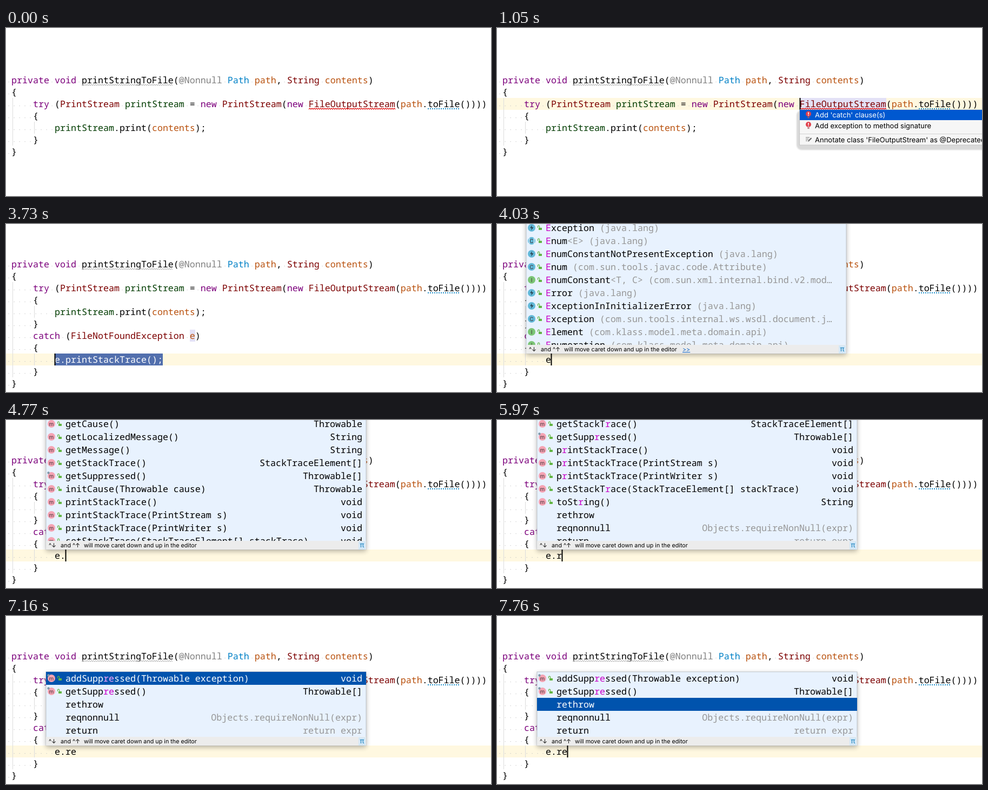
An HTML page for the animation above (8 s loop, 897 by 310 pixels).

```html
<!DOCTYPE html>
<html lang="en">
<head>
<meta charset="utf-8">
<title>Code completion</title>
<style>
  html, body { margin: 0; width: 100%; height: 100%; overflow: hidden; background: #fff; }
  svg { display: block; width: 897px; height: 310px; }
  text { white-space: pre; text-rendering: geometricPrecision; }
  .code { font: 16.667px "Noto Sans Mono", monospace; }
  .menu { font: 13px Inter, sans-serif; }
  .hint { font: 10.75px Inter, sans-serif; }
  .badge { font: 10px Inter, sans-serif; text-anchor: middle; }
</style>
</head>
<body>
<svg id="stage" viewBox="0 0 897 310" xmlns="http://www.w3.org/2000/svg"></svg>
<script>
const stage = document.getElementById('stage');
const LOOP = 8000, COL = 10, LINE = 22, ROW = 24;
const CUTS = [0, 450, 750, 1050, 2100, 2240, 2540, 3290, 3730, 3880, 4030, 4620, 4770,
  5220, 5670, 5970, 6260, 6410, 7160, 7460, 7760];

const COLORS = {};
const paint = (color, words) => words.split(' ').forEach(w => COLORS[w] = color);
paint('#7c007c', 'private void try new catch');
paint('#7c0000', 'String PrintStream FileOutputStream FileNotFoundException');
paint('#0080c6', 'Path');
paint('#b9520f', 'path contents e');
paint('#003c00', 'printStream');
paint('#808080', '@Nonnull');

const HEAD = [
  ' private void printStringToFile(@Nonnull Path path, String contents)',
  ' {',
  '     try (PrintStream printStream = new PrintStream(new FileOutputStream(path.toFile())))',
  '     {',
  '         printStream.print(contents);',
  '     }'
];
const CATCH = ['     catch (FileNotFoundException e)', '     {', '         ', '     }'];

const TYPES = [
  'x|Exception (java.lang)',
  'a|Enum<E> (java.lang)',
  'x|EnumConstantNotPresentException (java.lang)',
  'C|Enum (com.sun.tools.javac.code.Attribute)',
  'I|EnumConstant<T, C> (com.sun.xml.internal.bind.v2.mod…',
  'x|Error (java.lang)',
  'x|ExceptionInInitializerError (java.lang)',
  'C|Exception (com.sun.tools.internal.ws.wsdl.document.j…',
  'I|Element (com.klass.model.meta.domain.api)',
  'I|Enumeration (com.klass.model.meta.domain.api)'
];
const SUPPRESSED = 'f|getSuppressed()|Throwable[]';
const TRACE = 'm|getStackTrace()|StackTraceElement[]';
const PRINTS = [
  'm|printStackTrace()|void',
  'm|printStackTrace(PrintStream s)|void',
  'm|printStackTrace(PrintWriter s)|void',
  'm|setStackTrace(StackTraceElement[] stackTrace)|void'
];
const METHODS = [
  'm|getCause()|Throwable',
  'm|getLocalizedMessage()|String',
  'm|getMessage()|String',
  TRACE, SUPPRESSED,
  'm|initCause(Throwable cause)|Throwable',
  ...PRINTS
];
const TEMPLATES = ['|rethrow|', '|reqnonnull|Objects.requireNonNull(expr)', '|return|return expr'];
const WITH_R = [TRACE, SUPPRESSED, ...PRINTS, 'm|toString()|String', ...TEMPLATES];
const WITH_RE = ['f|addSuppressed(Throwable exception)|void', SUPPRESSED, ...TEMPLATES];

const esc = s => s.replace(/&/g, '&amp;').replace(/</g, '&lt;');
const rect = (x, y, w, h, fill, more = '') =>
  `<rect x="${x}" y="${y}" width="${w}" height="${h}" fill="${fill}" ${more}/>`;
const path = (d, stroke, width = 1, more = '') =>
  `<path d="${d}" fill="none" stroke="${stroke}" stroke-width="${width}" ${more}/>`;
const rawText = (x, y, body, kind, fill = '#000', more = '') =>
  `<text class="${kind}" x="${x}" y="${y}" fill="${fill}" ${more}>${body}</text>`;
const text = (x, y, s, ...rest) => rawText(x, y, esc(s), ...rest);
const span = (s, fill) => `<tspan fill="${fill}">${esc(s)}</tspan>`;

const wave = (x, y, w, color) => path(`M${x} ${y}` + 'l2 -2l2 2'.repeat(Math.floor(w / 4)), color, 1.1);
const guide = (x, from, to) => rect(x, from, 1, to - from, '#dcdcdc');
const caret = x => rect(x - .5, 239, 2, LINE, '#000');

function codeLine(s, top) {
  const indent = s.search(/\S|$/);
  const body = s.slice(indent).replace(/@?\w+/g, w => COLORS[w] ? span(w, COLORS[w]) : w);
  const dots = [...s].map((c, i) => c === ' ' ? rect(i * COL + 4.5, top + 14, 1.2, 1.2, '#c6c6c6') : '');
  return dots.join('') + rawText(indent * COL, top + 17, body, 'code');
}

function codeBlock(lines, top, error) {
  const row = n => top + n * LINE;
  return guide(12, row(2), row(lines.length - 1)) + guide(52, row(4), row(5)) +
    lines.map((s, i) => codeLine(s, row(i))).join('') +
    wave(140, top + 21, 170, '#bdbdbd') +
    (error ? wave(560, row(2) + 21, 160, '#e00000') : '') +
    path(`M780 ${row(2) + 20}H839`, '#1a8cc8', 2, 'stroke-dasharray="2 2"');
}

function bulb(x, y) {
  return `<circle cx="${x}" cy="${y - 1.5}" r="5" fill="#e0404c"/>` +
    rect(x - .8, y - 4.5, 1.6, 4, '#fff') + rect(x - .8, y + .5, 1.6, 1.5, '#fff') +
    rect(x - 2, y + 4, 4, 1, '#a06068') + rect(x - 1.5, y + 5.5, 3, 1, '#a06068');
}

function fixMenu() {
  return rect(554, 152, 360, 73, '#d9d9d9', 'rx="9" filter="url(#edge)"') +
    rect(559.5, 151, 350, 65, '#f6f6f6', 'stroke="#c4c4c4"') +
    rect(560, 151, 340, 19, '#0058d0') + rect(560, 195, 340, 1, '#d2d2d2') +
    bulb(576, 160) + bulb(576, 179.5) +
    path('M571 202h7M571 205h5M571 208h3', '#6e6e6e') + path('M575.5 209l6 -6', '#6e6e6e', 2.4) +
    text(588, 165, "Add 'catch' clause(s)", 'menu', '#fff') +
    text(588, 184.5, 'Add exception to method signature', 'menu') +
    text(588, 210.5, "Annotate class 'FileOutputStream' as @Deprecated", 'menu');
}

function icon(kind, x, y) {
  const fill = { m: '#f5a3b3', f: '#f5a3b3', I: '#7cc576' }[kind] || '#62b9d9';
  let out = `<circle cx="${x}" cy="${y}" r="7" fill="${fill}"/>`;
  if (kind === 'x') out += `<path d="M${x + 1} ${y - 5}l-4 5.5h3l-1 4.5l4.5 -6h-3.2z" fill="#29424e"/>`;
  else out += text(x, y + 3.5, { f: 'm', a: 'C' }[kind] || kind, 'badge', '#40343a');
  if (kind === 'a') out += path(`M${x - 4.5} ${y - 6}v12M${x + 4.5} ${y - 6}v12`, '#e8f2fe', 1.2);
  if (kind === 'f') out += `<circle cx="${x - 5.5}" cy="${y - 5.5}" r="2.2" fill="#7f98a8"/>`;
  return out + rect(x + 13, y, 6, 4, '#62b543') +
    path(`M${x + 11.5} ${y}v-2.2a1.6 1.6 0 0 1 3.2 0v2.2`, '#62b543', 1.2);
}

function label(s, match, typed, on) {
  const at = match ? s.indexOf(match) : -1;
  const cut = typed ? s.search(/[< ]/) : s.length;
  const ink = on ? '#fff' : '#000';
  const start = Math.max(at, 0), end = at < 0 ? 0 : at + match.length;
  return span(s.slice(0, start), ink) + span(s.slice(start, end), on ? '#ffa6ff' : '#c800c8') +
    span(s.slice(end, cut), ink) + span(s.slice(cut), '#969696');
}

function listRow(row, i, p) {
  const [kind, name, right] = row.split('|');
  const y = p.first + i * ROW, on = i === p.selected;
  let out = on ? rect(p.x, y - 12, p.w, ROW, '#0053ad') : '';
  if (kind) out += icon(kind, p.x + 10, y);
  out += rawText(p.x + 36, y + 6, label(name, kind && p.match, right === undefined, on), 'code');
  if (right) {
    const ink = on ? '#fff' : kind ? '#000' : '#969696';
    out += text(p.x + p.w - 7, y + 6, right, 'code', ink, 'text-anchor="end"');
  }
  return out;
}

function footer(p) {
  const right = p.x + p.w, base = 235;
  return rect(p.x, 223, p.w, 16, '#ececec') +
    [[5, '^↓'], [27, 'and'], [49, '^↑'], [70, 'will move caret down and up in the editor']]
      .map(([dx, s]) => text(p.x + dx, base, s, 'hint')).join('') +
    (p.link ? text(p.x + 289, base, '>>', 'hint', '#1266c4', 'text-decoration="underline"') : '') +
    rect(right - 14, 224, 13, 15, '#d3e7f6') + text(right - 7.5, base, 'π', 'badge', '#147fbd', 'style="font-size:13px"');
}

// A short list is cut off without its footer.
function popup(opts) {
  const p = { x: 74, w: 592, top: -40, first: 7, bottom: 239, ...opts };
  const h = p.bottom - p.top, short = p.bottom < 239;
  const shade = short
    ? rect(p.x - 10, p.top, p.w + 21, h + 9, '#d9d9d9', 'rx="10" filter="url(#edge)"')
    : rect(p.x, p.top + 3, p.w, h, '#000', 'opacity=".3" filter="url(#soft)"');
  return `<clipPath id="list"><rect x="${p.x}" y="${p.top}" width="${p.w}" height="${short ? h : h - 16}"/></clipPath>` +
    shade + rect(p.x, p.top, p.w, h, '#e8f2fe', 'stroke="#b4b9bf" stroke-width=".8"') +
    `<g clip-path="url(#list)">${p.rows.map((r, i) => listRow(r, i, p)).join('')}</g>` +
    (short ? '' : footer(p));
}

const FILTERS = `<defs>
  <filter id="soft" x="-10%" y="-20%" width="120%" height="140%"><feGaussianBlur stdDeviation="5"/></filter>
  <filter id="edge"><feGaussianBlur stdDeviation=".8"/></filter></defs>`;
const BAND = '#fff8e0', MARK = '#e3e1f6';

function before(t) {
  return (t >= 450 ? rect(0, 129, 897, LINE, BAND) : '') +
    (t >= 750 ? rect(560, 129, 160, LINE, MARK) : '') +
    codeBlock([...HEAD, ' }'], 85, true) +
    (t >= 450 ? rect(559.5, 129, 2, LINE, '#000') : '') +
    (t >= 1050 && t < 2100 ? fixMenu() : '');
}

function completion(t) {
  if (t < 4030) return '';
  if (t < 4620) return popup({ x: 54, rows: TYPES, match: 'E', link: true });
  if (t < 4770) return '';
  if (t < 5970) return popup({ rows: METHODS });
  if (t < 6410) return popup({ rows: WITH_R, match: 'r', bottom: t < 6260 ? 239 : 83 });
  const selected = t < 7460 ? 0 : t < 7760 ? 1 : 2;
  return popup({ rows: WITH_RE, match: 're', top: 103, first: 115, selected });
}

function after(t) {
  const chosen = t < 3880;
  const typed = chosen ? 'e.printStackTrace();' : t < 4620 ? 'e' : t < 5970 ? 'e.' : t < 6410 ? 'e.r' : 'e.re';
  const hidden = [[3290, 3730], [5220, 5670], [7160, 7760]].some(([a, b]) => t >= a && t < b);
  return rect(0, 239, 897, LINE, BAND) +
    (t >= 2540 ? rect(340, 195, COL, LINE, MARK) + guide(52, 239, 261) : '') +
    codeBlock([...HEAD, ...CATCH, ' }'], 63, t < 2540) +
    (chosen ? rect(90, 239, 200, LINE, '#526fad') : '') +
    text(90, 256, typed, 'code', chosen ? '#fff' : '#000') +
    completion(t) +
    (hidden ? '' : caret(90 + (chosen ? 0 : typed.length * COL)));
}

let shown = -1;
function render(now) {
  const t = now % LOOP;
  const step = CUTS.filter(c => c <= t).length - 1;
  if (step !== shown) {
    shown = step;
    const at = CUTS[step];
    stage.innerHTML = FILTERS + (at < 2240 ? before(at) : after(at));
  }
}

const begin = performance.now();
function tick() {
  render(performance.now() - begin);
  requestAnimationFrame(tick);
}
tick();
</script>
</body>
</html>
```
